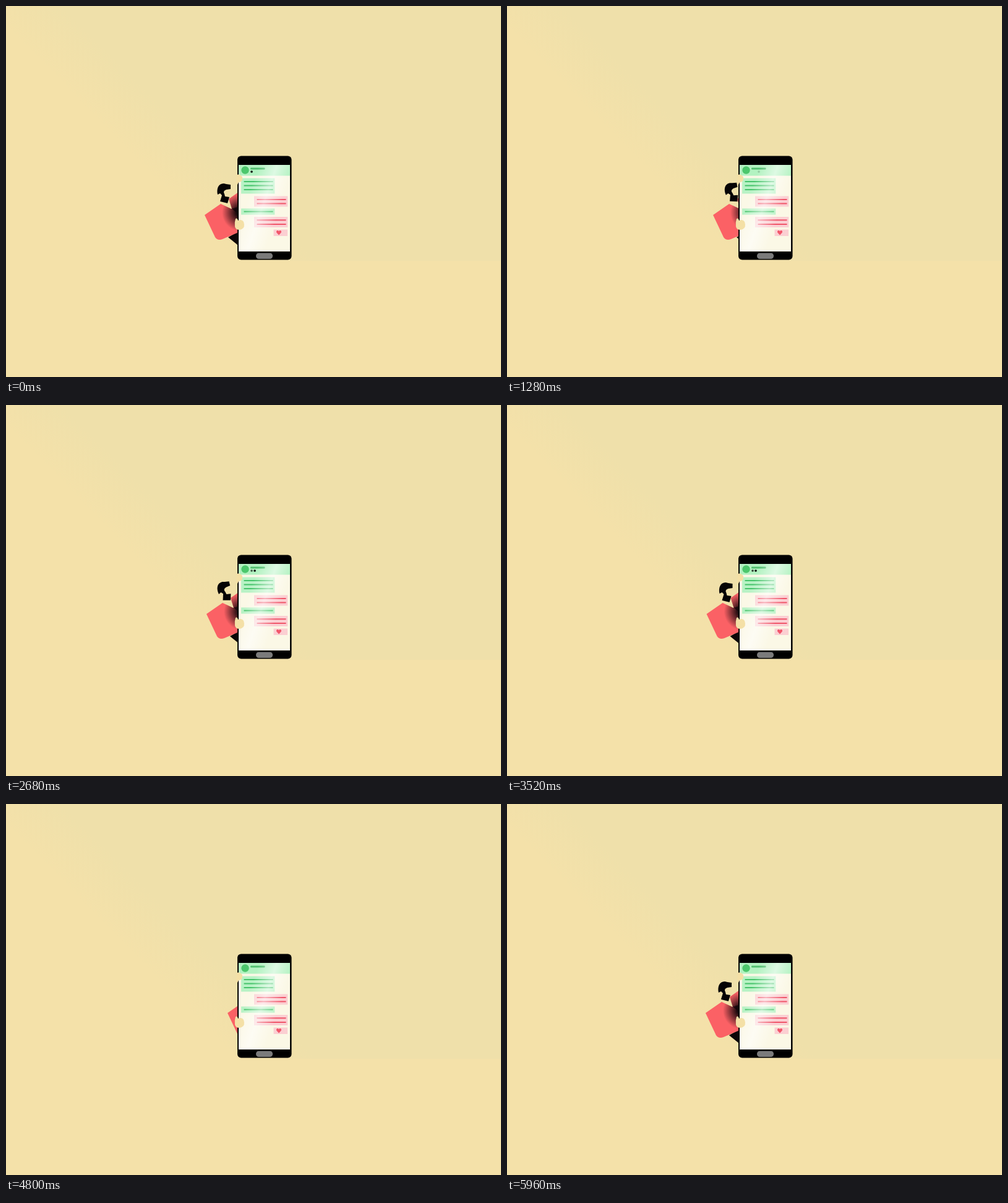
Write an HTML page that moves like this. It is 800 by 600 pixels and loops after 6 s.

```html
<!DOCTYPE html>
<html>
<head>
<meta charset="utf-8">
<style>
  html, body { margin: 0; width: 100%; height: 100%; overflow: hidden; background: #f4e1a9; }
  svg { display: block; width: 800px; height: 600px; }
</style>
</head>
<body>
<svg viewBox="0 0 800 600">
  <defs>
    <linearGradient id="light" gradientUnits="userSpaceOnUse" x1="165" y1="205" x2="230" y2="140">
      <stop offset="0" stop-color="#f4e1a9"/>
      <stop offset="1" stop-color="#efe0aa"/>
    </linearGradient>
    <radialGradient id="shade" gradientUnits="userSpaceOnUse" cx="379" cy="334" r="30">
      <stop offset=".2" stop-color="#100408"/>
      <stop offset="1" stop-color="#100408" stop-opacity="0"/>
    </radialGradient>
    <linearGradient id="glare" gradientUnits="userSpaceOnUse" x1="386" y1="323" x2="438" y2="341">
      <stop offset="0" stop-color="#fff" stop-opacity="0"/>
      <stop offset=".5" stop-color="#fff" stop-opacity=".55"/>
      <stop offset="1" stop-color="#fff" stop-opacity="0"/>
    </linearGradient>
  </defs>

  <path fill="url(#light)" d="M374 412L0 30V0H800V412Z"/>

  <g id="body">
    <path fill="#0c0608" d="M359 374L380 362V391Z"/>
    <g id="coat">
      <path d="M360 312L380 298V340L365 328Z"/>
      <path d="M321 338L347 320L364 328L385 322V362L350 377Q342 380 338 374Z"/>
    </g>
  </g>
  <path id="head" fill="#060405" d="M342 305C340 296 343 287 352 287L356 288L363 289V296L356 297Q350 299 353 304L354 308L361 309L358 319L346 316L349 306L346 303Z"/>

  <rect x="374" y="242.5" width="87.5" height="168" rx="6"/>
  <path fill="#fbf8e6" d="M376 257H459V397H376Z"/>
  <path fill="#b3f2c1" d="M376 257H459V274.5H376Z"/>
  <circle cx="386.5" cy="265.5" r="6.2" fill="#4cc76c"/>
  <rect x="395" y="261.5" width="23.5" height="3" rx="1" fill="#52bf70"/>
  <g id="chat"></g>
  <path fill="#fbcfd2" d="M432.5 361.5H455V372H432.5Z"/>
  <path fill="#f2566a" d="M441 370.5L437.3 366.5C435.8 363.5 439.5 361.6 441 364.6C442.5 361.6 446.2 363.5 444.7 366.5Z"/>
  <path fill="url(#glare)" d="M376 257H459V397H376Z"/>
  <g id="dots"></g>
  <rect x="404" y="399.5" width="27" height="9.5" rx="4.5" fill="#7b7b7b"/>

  <g fill="#f4e0a6">
    <path d="M373 273Q379 271 382 277Q383 285 376 285L374 289H372Z"/>
    <path d="M371 344Q374 342 375 347Q381 344 384 349Q387 358 381 361Q372 364 370 357Q369 350 371 344Z"/>
  </g>
</svg>
<script>
const LOOP = 6000, PEEK = LOOP / 2, TYPING = LOOP / 7;
const $ = id => document.getElementById(id);

function add(parent, tag, attrs) {
  const el = document.createElementNS('http://www.w3.org/2000/svg', tag);
  for (const k in attrs) el.setAttribute(k, attrs[k]);
  return parent.appendChild(el);
}

// Chat bubbles: x, y, height, fill, line colour, line positions
const GREEN = ['#b8f2c5', '#46c46a'], RED = ['#fbcfd2', '#f0566a'];
for (const [x, y, h, [fill, stroke], lines] of [
  [380, 278.5, 25, GREEN, [284, 290.5, 297]],
  [401, 307.5, 17, RED, [313, 319.6]],
  [380, 327.5, 10, GREEN, [332.5]],
  [401, 341, 17, RED, [346.3, 353]]
]) {
  add($('chat'), 'rect', { x, y, width: 54.3, height: h, fill });
  for (const ly of lines) add($('chat'), 'path', { d: `M${x + 4.5} ${ly}h47`, stroke, 'stroke-width': 2 });
}

// The coat is painted flat, then shaded over the same outline
const shadow = $('coat').cloneNode(true);
shadow.removeAttribute('id');
shadow.setAttribute('fill', 'url(#shade)');
$('coat').setAttribute('fill', '#fb6165');
$('body').append(shadow);

const dots = [397, 402, 407].map(cx => add($('dots'), 'circle', { cx, cy: 268, r: 1.8 }));

// Time, body shift, head shift, head tilt
const KEYS = [
  [0, 0, 0, 0],
  [520, 1.5, 1.5, 0],
  [1280, 12, 11, -12],
  [1800, 37, 40, -14],
  [2080, 36, 31, -14],
  [2680, 3, 1, -14],
  [2940, 0, 0, 0]
];

function key(i) {
  const n = KEYS.length, turn = Math.floor(i / n), k = KEYS[i - turn * n];
  return [k[0] + turn * PEEK, ...k.slice(1)];
}

// Smooth curve through the keys
function pose(t) {
  let i = KEYS.length - 1;
  while (KEYS[i][0] > t) i--;
  const [a, b, c, d] = [-1, 0, 1, 2].map(o => key(i + o));
  const h = c[0] - b[0], u = (t - b[0]) / h;
  return [1, 2, 3].map(j => {
    const m0 = (c[j] - a[j]) / (c[0] - a[0]) * h;
    const m1 = (d[j] - b[j]) / (d[0] - b[0]) * h;
    const s = u * u * (3 - 2 * u);
    return b[j] + (c[j] - b[j]) * s + u * (1 - u) * (m0 * (1 - u) - m1 * u);
  });
}

function draw(t) {
  const [body, head, tilt] = pose(t % PEEK);
  $('body').setAttribute('transform', `translate(${body})`);
  $('head').setAttribute('transform', `translate(${head} ${tilt / 10}) rotate(${tilt} 352 302)`);
  dots.forEach((dot, i) => {
    const age = (t + 30 - i * 120 + TYPING) % TYPING;
    dot.setAttribute('opacity', Math.max(0, Math.min(1, (240 - age) / 160)));
  });
}

const start = performance.now();
function tick() {
  draw((performance.now() - start) % LOOP);
  requestAnimationFrame(tick);
}
tick();
</script>
</body>
</html>
```
